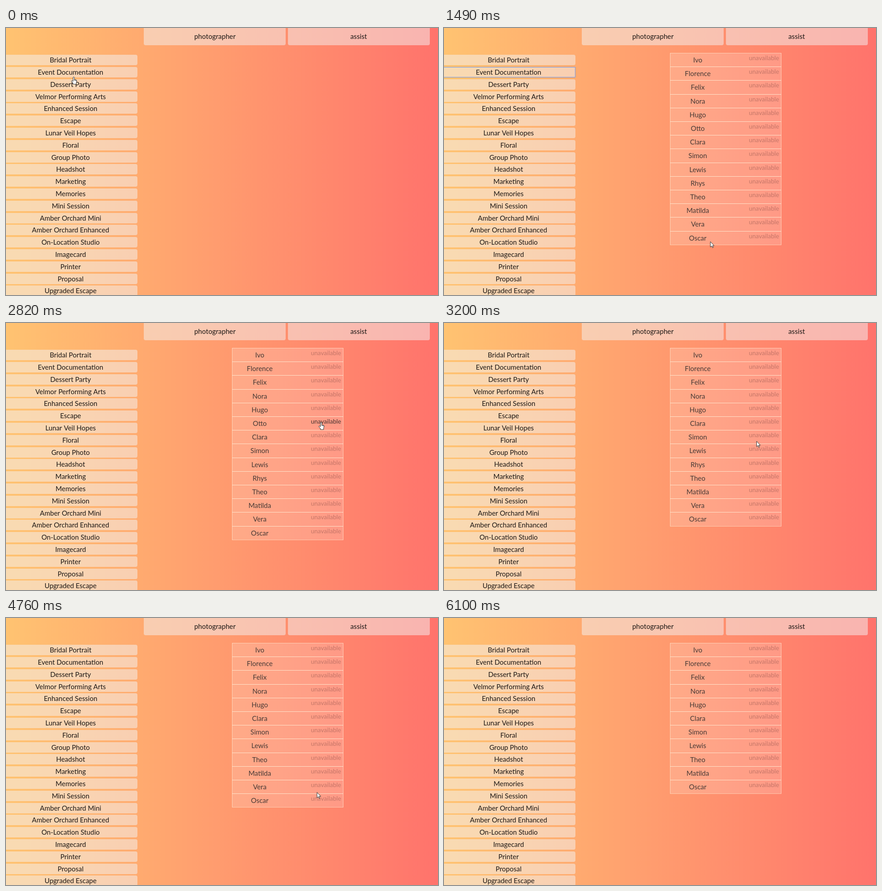
Animation, 950 px wide and 589 px high, one loop 6.8 s. Source, as an HTML page with a canvas:

```html
<!DOCTYPE html>
<html lang="en">
<head>
<meta charset="utf-8">
<title>Scheduling</title>
<style>
  html, body { margin: 0; width: 100%; height: 100%; overflow: hidden; }
  canvas { display: block; }
</style>
</head>
<body>
<canvas id="stage" width="950" height="589"></canvas>
<script>
const ctx = document.getElementById('stage').getContext('2d');
const LOOP = 6800, FRAME = 80;
const FOCUS_ON = 470, LIST_SHOWN = 550, FOCUS_OFF = 2820;

const sessions = [
  'Bridal Portrait', 'Event Documentation', 'Dessert Party', 'Velmor Performing Arts',
  'Enhanced Session', 'Escape', 'Lunar Veil Hopes', 'Floral', 'Group Photo', 'Headshot',
  'Marketing', 'Memories', 'Mini Session', 'Amber Orchard Mini', 'Amber Orchard Enhanced',
  'On-Location Studio', 'Imagecard', 'Printer', 'Proposal', 'Upgraded Escape'
];
const people = ['Ivo', 'Florence', 'Felix', 'Nora', 'Hugo', 'Otto', 'Clara',
  'Simon', 'Lewis', 'Rhys', 'Theo', 'Matilda', 'Vera', 'Oscar'];
const removedAt = { Otto: 2890, Rhys: 3980, Vera: 5340 };

// Each sweep eases from the previous place to x, y, bowing out to the right.
const pointerStart = { x: 149, y: 108 };
const sweeps = [
  { start: 90, end: 170, x: 152, y: 102 },
  { start: 1010, end: 1660, x: 650, y: 526 },
  { start: 1740, end: 2360, x: 693, y: 211, bow: 65 },
  { start: 2590, end: 2670, x: 693, y: 219 },
  { start: 3080, end: 3510, x: 682, y: 302 },
  { start: 4210, end: 4860, x: 679, y: 390, bow: 25 },
  { start: 4920, end: 5100, x: 696, y: 374 },
  { start: 5480, end: 6100, x: 830, y: 600 }
];

const hand = new Path2D('M-1.5 .8Q0 -1 1.3 .8V5.6L5.4 6.6Q6.7 7 6.5 9L5.5 12.5V16H-1.5V14L-5 9.6Q-5.4 7.8 -3.4 8.2L-1.5 9.8Z');
const handLines = new Path2D('M1.3 5.6V8M3.4 6.2V8.3M5.2 6.8V8.7');
const arrow = new Path2D('M0 0V12L2.8 9.4 4.6 13.5 6.4 12.8 4.6 8.8H8.3Z');
const textBeam = new Path2D('M-3 -3Q0 -3 0 -1Q0 -3 3 -3M0 -1V7');

const background = ctx.createLinearGradient(0, 0, 950, 0);
background.addColorStop(0, '#ffc371');
background.addColorStop(1, '#ff736c');

const sessionTop = i => Math.round(59.2 + i * 26.8);
const rowTop = i => Math.round(55 + i * 30.2);
const easeOut = p => 1 - (1 - p) ** 1.4;

function pointerAt(time) {
  let { x, y } = pointerStart;
  for (const sweep of sweeps) {
    if (time < sweep.start) break;
    const part = (time - sweep.start + FRAME) / (sweep.end - sweep.start + FRAME);
    const eased = easeOut(Math.min(1, part));
    x += (sweep.x - x) * eased + (sweep.bow || 0) * Math.sin(Math.PI * eased);
    y += (sweep.y - y) * eased;
  }
  return { x, y };
}

function label(text, x, y, size = 15, color = '#1c1714', align = 'center') {
  ctx.font = `${size}px Lato, sans-serif`;
  ctx.fillStyle = color;
  ctx.textAlign = align;
  ctx.fillText(text, x, y);
}

function panel(x, y, w, h) {
  ctx.fillStyle = 'rgba(243,243,243,.5)';
  ctx.beginPath();
  ctx.roundRect(x, y, w, h, 4);
  ctx.fill();
}

function drawSessions(focused) {
  sessions.forEach((name, i) => {
    const y = sessionTop(i);
    panel(-5, y, 294, 23);
    if (focused && name === 'Event Documentation') {
      ctx.strokeStyle = '#6c9cf0';
      ctx.strokeRect(-5.5, y + 0.5, 294, 22);
    }
    label(name, 142, y + 17);
  });
}

function overLink(p, row) {
  return p.x > 669 && p.x < 738 && Math.abs(p.y - rowTop(row) - 12) < 10.5;
}

function drawPeople(list, pointer) {
  ctx.strokeStyle = 'rgba(255,240,215,.6)';
  list.forEach((name, i) => {
    const y = rowTop(i), height = rowTop(i + 1) - y;
    ctx.fillStyle = 'rgba(255,255,255,.17)';
    ctx.fillRect(497, y, 245, height);
    // Neighbouring rows share an edge, which makes it brighter.
    ctx.strokeRect(497.5, y + 0.5, 244, height);
    label(name, 558, y + 20.5, 15, '#463a36');
    label('unavailable', 737, y + 16, 13.6,
      overLink(pointer, i) ? '#493532' : 'rgba(90,50,50,.35)', 'right');
  });
}

function drawPointer(time, p, list) {
  const overSession = p.x < 289 && sessions.some((_, i) => Math.abs(p.y - sessionTop(i) - 11.5) < 12);
  const overHand = overSession || list.some((_, i) => overLink(p, i));
  const listShifted = Object.values(removedAt).some(at => time >= at && time < at + FRAME);
  ctx.save();
  ctx.translate(p.x, p.y);
  ctx.lineJoin = 'round';
  ctx.strokeStyle = '#333';
  if (listShifted) {
    ctx.stroke(textBeam);
  } else {
    const shape = overHand ? hand : arrow;
    ctx.fillStyle = '#fff';
    ctx.fill(shape);
    ctx.stroke(shape);
    if (overHand) ctx.stroke(handLines);
  }
  ctx.restore();
}

function draw() {
  const time = performance.now() % LOOP;
  const pointer = pointerAt(time);
  const list = time < LIST_SHOWN ? [] : people.filter(name => !(time >= removedAt[name]));

  ctx.fillStyle = background;
  ctx.fillRect(0, 0, 950, 589);
  panel(303, -6, 312, 44);
  panel(620, -6, 312, 44);
  label('photographer', 459.5, 23.5, 15.2);
  label('assist', 775.5, 23.5, 15.2);
  drawSessions(time >= FOCUS_ON && time < FOCUS_OFF);
  drawPeople(list, pointer);
  drawPointer(time, pointer, list);
  requestAnimationFrame(draw);
}
draw();
</script>
</body>
</html>
```
